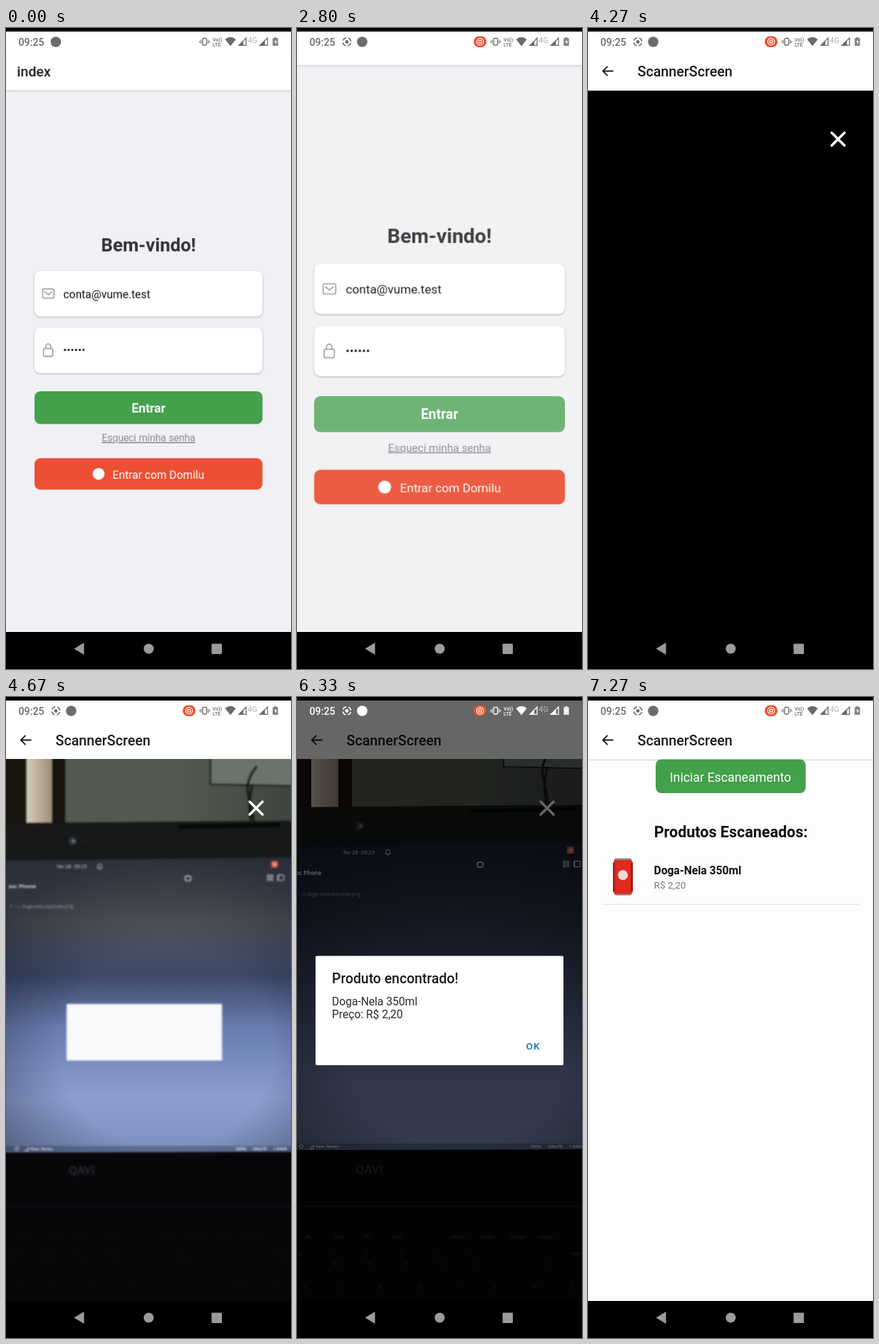
An HTML page for the animation above (8 s loop, 400 by 900 pixels).

```html
<!DOCTYPE html>
<html lang="pt-BR">
<head>
<meta charset="utf-8">
<title>Scanner de produtos</title>
<style>
  html, body { margin: 0; width: 100%; height: 100%; overflow: hidden; background: #000; }
  svg { display: block; width: 100vw; height: 100vh; }
  text { font-family: Roboto, sans-serif; }
  .medium { font-weight: 500; }
  .bold { font-weight: 700; }
  .mid { text-anchor: middle; }
  .card { fill: #fff; filter: drop-shadow(0 1px 1.2px #0004); }
  .bar { fill: #fff; filter: drop-shadow(0 1px 1px #0003); }
  .line { fill: none; stroke: currentColor; }
  #login, #page { transform-origin: 200px 441px; }
  #record { transform-origin: 257px 19px; }
  #scene text { fill: #dfe4ee; font-size: 7.5px; font-family: "Open Sans", sans-serif; }
  #scene .tiny text { font-size: 6px; }
  #scene #keys text { fill: #70747c; font-size: 7px; }
</style>
</head>
<body>
<svg viewBox="0 0 400 900">
  <defs>
    <clipPath id="appArea"><path d="M0 34H400V848H0Z"/></clipPath>
    <clipPath id="viewArea"><path d="M0 87.5H400V848H0Z"/></clipPath>
    <linearGradient id="wall">
      <stop offset="0" stop-color="#545b4f"/><stop offset=".6" stop-color="#525a4f"/><stop offset="1" stop-color="#3a413b"/>
    </linearGradient>
    <linearGradient id="patch">
      <stop offset="0" stop-color="#d2d0bd"/><stop offset=".35" stop-color="#c4b5a2"/><stop offset="1" stop-color="#a08d7b"/>
    </linearGradient>
    <linearGradient id="screen" x2="0" y2="1">
      <stop offset="0" stop-color="#232c3f"/><stop offset=".27" stop-color="#333f58"/><stop offset=".5" stop-color="#4d5c82"/>
      <stop offset=".78" stop-color="#778bb8"/><stop offset="1" stop-color="#8094c0"/>
    </linearGradient>
    <linearGradient id="hazy" x2="0" y2="1">
      <stop offset="0" stop-color="#45484e"/><stop offset=".22" stop-color="#56585d"/><stop offset=".4" stop-color="#3e4a69"/>
      <stop offset=".58" stop-color="#6a7db0"/><stop offset=".82" stop-color="#8c9fd0"/><stop offset="1" stop-color="#7d90be"/>
    </linearGradient>
    <radialGradient id="edges" cx=".55" cy=".65" r=".68">
      <stop offset=".5" stop-color="#0a1020" stop-opacity="0"/><stop offset="1" stop-color="#0a1020" stop-opacity=".45"/>
    </radialGradient>
  </defs>

  <rect width="400" height="900"/>

  <g clip-path="url(#appArea)">
    <rect width="400" height="848" fill="#fff"/>
    <g id="login">
      <rect y="20" width="400" height="840" fill="#f1f0f4"/>
      <rect class="bar" y="20" width="400" height="67.5"/>
      <text class="medium" x="15.5" y="68" font-size="19.6" fill="#1c1c1e">index</text>
      <text class="bold mid" x="200" y="314" font-size="25.8" fill="#333">Bem-vindo!</text>
      <rect class="card" x="40" y="341" width="320" height="64" rx="8"/>
      <rect class="card" x="40" y="420.5" width="320" height="64" rx="8"/>
      <g class="line" color="#8a8a8e" stroke-width="1.3" stroke-linejoin="round">
        <rect x="51.5" y="366.5" width="16" height="13" rx="2"/>
        <path d="M54 370l5.5 4.5 5.5-4.5"/>
        <rect x="52.7" y="450" width="13" height="11" rx="2"/>
        <path d="M55.7 450v-3a3.5 3.5 0 0 1 7 0v3"/>
      </g>
      <text x="80.5" y="379" font-size="15.6" fill="#111">conta@vume.test</text>
      <path d="M82.7 452H111" stroke="#111" stroke-width="3.2" stroke-linecap="round" stroke-dasharray="0 5.2"/>
      <g id="enter">
        <rect x="40" y="510" width="320" height="46" rx="8" fill="#43a04b"/>
        <text class="bold mid" x="200" y="539.5" font-size="17.6" fill="#fff">Entrar</text>
      </g>
      <text class="mid" x="200" y="580.5" font-size="13.9" fill="#8b8b8e" text-decoration="underline">Esqueci minha senha</text>
      <rect x="40" y="604" width="320" height="44" rx="8" fill="#eb5034"/>
      <circle cx="130" cy="626" r="8.3" fill="#fff"/>
      <text x="149.5" y="632.5" font-size="15.6" fill="#fff">Entrar com Domilu</text>
    </g>

    <g id="page">
      <rect y="20" width="400" height="840" fill="#fefdfe"/>
      <rect class="bar" y="20" width="400" height="67.5"/>
      <path class="line" color="#1c1c1e" d="M35.5 60.5H21M27.5 53.8L20.8 60.5L27.5 67.2" stroke-width="1.8"/>
      <text class="medium" x="69.5" y="68" font-size="19.7" fill="#1c1c1e">ScannerScreen</text>
      <g id="scanButton">
        <rect x="95" y="87.5" width="210.5" height="47.5" rx="8" fill="#43a04b"/>
        <text class="mid" x="200" y="118.5" font-size="17.8" fill="#fff">Iniciar Escaneamento</text>
      </g>
      <g id="list">
        <text class="bold mid" x="200.5" y="197" font-size="21.5" fill="#111">Produtos Escaneados:</text>
        <text class="bold" x="92.5" y="249" font-size="15.6" fill="#111">Doga-Nela 350ml</text>
        <text x="92.5" y="268.5" font-size="13.6" fill="#77777a">R$ 2,20</text>
        <path d="M20 291.2H380" stroke="#dcdce0"/>
        <g id="can">
          <path d="M38 227H60L63 233V273L60 278H38L35 273V233Z" fill="#df2b20"/>
          <path d="M38 226.5H60L61 229H37ZM38 276.5H60L59 278.5H39Z" fill="#8b8583"/>
          <path d="M35 233H38V273H35ZM60 233H63V273H60Z" fill="#a81c16"/>
          <circle cx="49" cy="250" r="7" fill="#f3dcd8"/>
        </g>
      </g>
    </g>

    <g id="camera" clip-path="url(#viewArea)">
      <rect y="87" width="400" height="762"/>
      <g id="scene">
        <rect x="-30" y="20" width="470" height="145" fill="url(#wall)"/>
        <path d="M-30 20H23V160H-30ZM61 20H80V160H61Z" fill="#17140f"/>
        <rect x="23" y="20" width="38" height="140" fill="url(#patch)"/>
        <path d="M293 20H440V99L293 96Z" fill="#6a736c" stroke="#1c211e" stroke-width="2"/>
        <path d="M361 70q-18 20-12 44t8 40M355 96q-8 24-2 58" fill="none" stroke="#161917" stroke-width="3"/>
        <path d="M-30 153L440 149V215H-30Z" fill="#17181a"/>
        <path d="M247 158L395 155.5" stroke="#060607" stroke-width="5"/>
        <circle cx="91" cy="179" r="6" fill="#34363a"/>
        <circle cx="92" cy="179" r="2.5" fill="#70747a"/>
        <path d="M108 178h3M142 177.5h3" stroke="#333" stroke-width="2"/>
        <path d="M-30 633H440V880H-30Z" fill="#070709"/>
        <path d="M-30 208L440 203V633L-30 634Z" fill="url(#screen)"/>
        <path id="haze" d="M-30 208L440 203V633L-30 634Z" fill="url(#hazy)"/>
        <path d="M-30 208L440 203V633L-30 634Z" fill="url(#edges)"/>
        <text x="68" y="219">fev 28&#160; 09:25</text>
        <rect x="382" y="208" width="10" height="10" rx="1.5" fill="#d6553f"/>
        <circle cx="387" cy="213" r="2" fill="none" stroke="#fff"/>
        <text class="bold" x="-3" y="247.5" style="font-size:8px">soc Phone</text>
        <g class="line" color="#d0d6e2">
          <path d="M127 218.5h7l-1-2v-3q-2.5-3-5 0v3ZM129.5 220.5h2"/>
          <rect x="256" y="230" width="8" height="7" rx="2.5" stroke-width="1.5"/>
          <path d="M376.5 228.5h3v3h-3zM376.5 233.5h3v3h-3zM381.5 228.5h3v3h-3zM381.5 233.5h3v3h-3zM391.5 228.5h9v8h-9zM393 229v7"/>
        </g>
        <text x="-2" y="277" opacity=".6" style="font-size:7px">7 / ▭ doga-nela-barcode.png</text>
        <rect x="82" y="417" width="228" height="83" rx="1" fill="#f8f9fb"/>
        <path d="M-30 625H440V633H-30Z" fill="#222b40" opacity=".35"/>
        <g class="tiny bold">
          <path class="line" color="#dfe4ee" d="M6.500 629a2.500 2.500 0 1 0 5 0a2.500 2.500 0 1 0-5 0M21 632l6-5-2 6z"/>
          <text x="29" y="631">Peer Notes</text>
          <text x="330" y="631">200%</text>
          <text x="355" y="631">206x76</text>
          <text x="385" y="631">1.84KB</text>
        </g>
        <text class="bold" x="85" y="667" style="font-size:16px;fill:#292a2e">QAVI</text>
        <path d="M-30 713H440" stroke="#15161a" stroke-width="2"/>
        <g id="keys"></g>
      </g>
      <path d="M342 147L360 165M360 147L342 165" stroke="#fff" stroke-width="3.4" stroke-linecap="round"/>
    </g>
  </g>

  <rect y="5" width="400" height="30" fill="#fff"/>
  <rect id="scrim" y="5" width="400" height="843"/>

  <g id="dialog">
    <rect x="26" y="363.5" width="348" height="153.5" rx="2" fill="#fff"/>
    <text class="medium" x="49" y="402" font-size="19.4" fill="#1c1c1e">Produto encontrado!</text>
    <text x="49" y="432.5" font-size="15.6" fill="#2b2b2d">Doga-Nela 350ml</text>
    <text x="49" y="451" font-size="15.6" fill="#2b2b2d">Preço: R$ 2,20</text>
    <text class="medium" x="321.5" y="495" font-size="13.6" letter-spacing="1.2" fill="#1273b8">OK</text>
  </g>

  <g id="status" fill="currentColor">
    <text class="medium" x="17.5" y="25" font-size="14.2">09:25</text>
    <g id="cast">
      <circle class="line" cx="70" cy="19.5" r="5.7" stroke-width="1.5" stroke-dasharray="5.95 3" stroke-dashoffset="-1.5"/>
      <circle cx="70" cy="19.5" r="2.4"/>
    </g>
    <circle id="badge" cx="70" cy="19.5" r="7.3"/>
    <rect class="line" x="276" y="14.5" width="5.5" height="9.5" rx="1" stroke-width="1.3"/>
    <path class="line" d="M273.800 16.5v5.5M283.700 16.5v5.5M271.800 18v2.5M285.700 18v2.5" stroke-width="1.1"/>
    <text class="medium" x="290" y="18.5" font-size="7">Vo))</text>
    <text class="medium" x="290" y="25.5" font-size="7">LTE</text>
    <path d="M307.5 16Q315 9.5 322.5 16L315 25.5Z"/>
    <path class="line" d="M327 24.3L337 14V24.3ZM356.5 24.3L367 14V24.3Z" stroke-width="1.3"/>
    <path d="M326.5 24.5L333 18V24.5ZM356 24.5L363.5 17V24.5Z"/>
    <text x="339.5" y="20.5" font-size="10.5" opacity=".55">4G</text>
    <path d="M376.5 13h3v1.3h2.2v10.7h-7.4v-10.7h2.2z" opacity=".85"/>
    <path d="M378.8 16l-2.3 4h1.5v3l2.3-4h-1.5z" fill="#fff"/>
  </g>
  <g id="record">
    <rect x="248" y="11.5" width="18" height="15.5" rx="7.7" fill="#ea5030"/>
    <g fill="none" stroke="#fff" stroke-width="1.2">
      <circle cx="257" cy="19.2" r="4.8"/>
      <circle cx="257" cy="19.2" r="2"/>
    </g>
  </g>

  <g fill="#9b9b9b">
    <path d="M109.5 863V880L95.5 871.5Z"/>
    <circle cx="200.3" cy="871.5" r="7"/>
    <rect x="288.5" y="864.5" width="14.5" height="14.5" rx="1"/>
  </g>
</svg>
<script>
const LOOP = 8000;

// Faint key legends: baseline, first x, pitch, labels
const keyRows = [
  [759, 15, 41, ["F9", "F10", "F11", "F12", "", "PrtScr", "Insert", "Delete", "Pause"]],
  [782, 4, 48, ["&", "*", "(", ")", "_", "+", "", "", "Num"]],
  [796, 4, 50, ["7", "8", "9", "0", "-", "=", "", "←", "▯"]],
  [828, 10, 54, ["U", "I", "O", "P", "´", "[", "↵", "7"]],
];
document.querySelector("#keys").innerHTML = keyRows.map(([y, x, pitch, labels]) =>
  labels.map((label, i) => `<text x="${x + i * pitch}" y="${y}">${label}</text>`).join("")).join("");

// Each step is [ms, value]; a repeated time makes a hard cut.
function play(id, property, steps) {
  const all = [[0, steps[0][1]], ...steps, [LOOP, steps.at(-1)[1]]];
  const frames = all.map(([ms, value]) => ({ offset: ms / LOOP, [property]: value }));
  document.getElementById(id).animate(frames, { duration: LOOP, iterations: Infinity });
}
const cut = (id, ms, before, after, property = "opacity") =>
  play(id, property, [[ms, before], [ms, after]]);
const showBetween = (id, from, to) =>
  play(id, "opacity", [[from, 0], [from, 1], [to, 1], [to, 0]]);

// Status icons arriving
play("badge", "transform", [[70, "translateX(0px)"], [330, "translateX(21.5px)"]]);
play("cast", "opacity", [[200, 0], [400, 1]]);
play("record", "transform", [[70, "scale(0)"], [400, "scale(1)"]]);

// Login to scanner page
play("enter", "opacity", [[2590, 1], [2670, .8], [2850, .8], [2930, 1]]);
play("login", "transform", [[2660, "scale(1)"], [2730, "scale(1.05)"], [2800, "scale(1.1)"], [2870, "scale(1.1)"], [2930, "scale(1.14)"]]);
play("login", "opacity", [[2660, 1], [2800, .93], [2935, .93], [2935, 0]]);
play("page", "opacity", [[2865, 0], [2865, .8], [2930, 1]]);
play("page", "transform", [[2790, "scale(.9)"], [2870, "scale(.98)"], [2930, "scale(1)"]]);

// Scanner button, camera, scanned list
play("scanButton", "opacity", [[3660, 1], [3740, .35], [3860, .35], [3870, 1]]);
cut("scanButton", 6600, "translateY(357px)", "translateY(0px)", "transform");
showBetween("camera", 3865, 6600);
showBetween("scene", 4465, 6600);
cut("list", 6600, 0, 1);
cut("can", 6790, 0, 1);

// Hand-held camera settling and focusing
const pose = (x, y, sx = 1, sy = 1) => `translate(${x}px, ${y}px) scale(${sx}, ${sy})`;
play("scene", "transform", [
  [4465, pose(8, 36, .95, .953)], [4670, pose(6.5, 30.4, .957, .96)], [4730, pose(6.5, 30.4, .957, .96)],
  [5000, pose(2, 10, .985, .985)], [5300, pose(0, 0)], [5400, pose(0, 0)],
  [5800, pose(-2, 2)], [6330, pose(-3, 2)],
]);
play("scene", "filter", [[4465, "blur(2.5px)"], [4670, "blur(1.1px)"], [4800, "blur(1px)"], [5100, "blur(.2px)"], [5200, "blur(0px)"]]);
play("haze", "opacity", [[4740, 1], [5150, 0]]);
play("keys", "opacity", [[4700, .1], [5250, .55]]);

// Result dialog
play("dialog", "opacity", [[5250, 0], [5330, .43], [5380, .45], [5500, 1], [6400, 1], [6590, 0]]);
play("scrim", "opacity", [[5270, 0], [5330, .12], [5380, .13], [5530, .6], [6400, .6], [6600, 0]]);
play("status", "color", [[5250, "#6b6b6b"], [5330, "#bcb9bc"], [5380, "#bcb9bc"], [5500, "#fff"], [6400, "#fff"], [6600, "#6b6b6b"]]);
</script>
</body>
</html>
```
